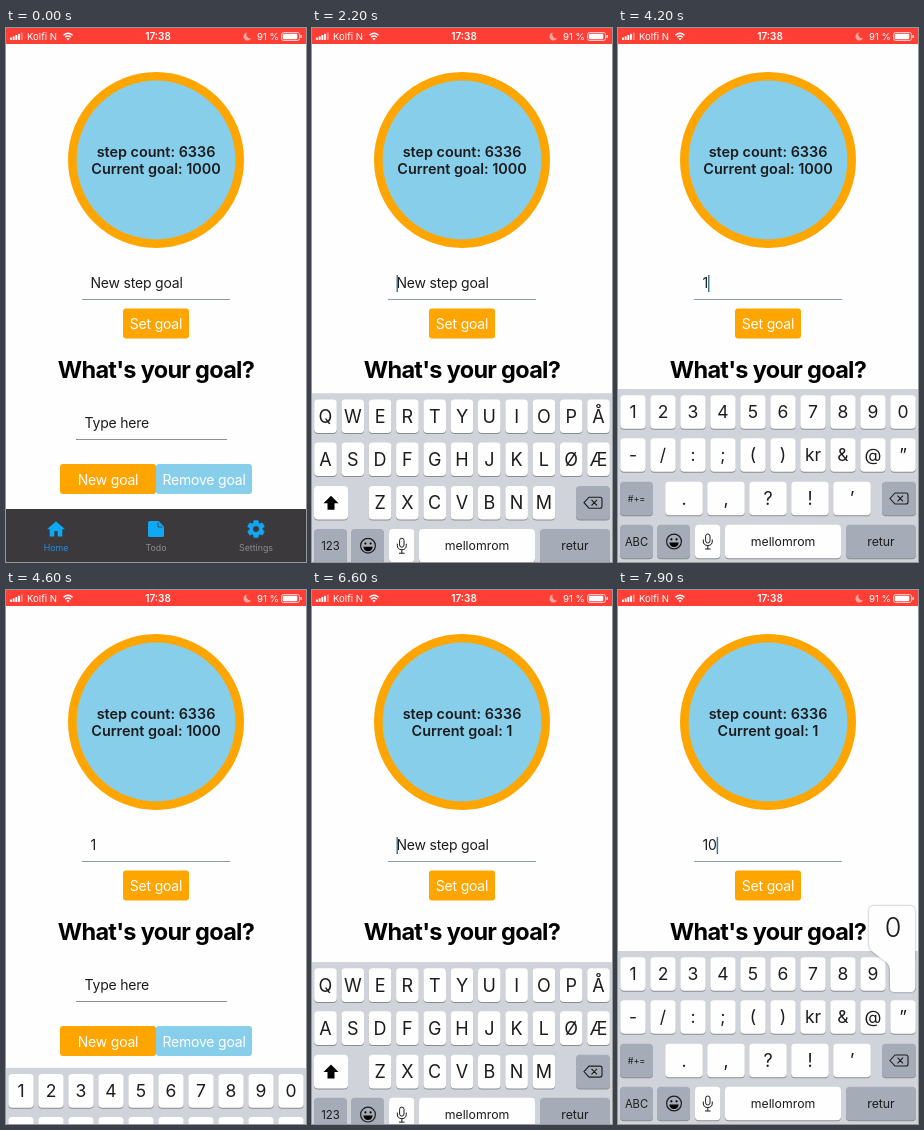
Write an HTML page that moves like this. It is 300x534 px and loops after 8000 ms.

```html
<!DOCTYPE html>
<html lang="en">
<head>
<meta charset="utf-8">
<title>Step goal</title>
<style>
  html, body { margin: 0; width: 100%; height: 100%; overflow: hidden; background: #fefefe; }
  svg { display: block; width: 100%; height: 100%; }
  text { font-family: Inter, "Open Sans", sans-serif; white-space: pre; }
  .body { font-size: 14px; letter-spacing: -.2px; }
  .mid { text-anchor: middle; }
  .popup path { filter: drop-shadow(0 0 1px #0006); }
</style>
</head>
<body>
<svg id="stage" viewBox="0 0 300 534"></svg>
<script>
const LOOP = 8000, STEP = 100, KEYBOARD_HEIGHT = 173;
const ORANGE = '#ffa500', SKY = '#87ceeb', INK = '#1c1c1e', BLUE = '#10a7f4', BAR = '#3b393b';
const WHITE = '#fefefe', GREY_KEY = '#a5acb8';

const label = (str, x, y, size, fill = INK, extra = '') =>
  `<text class="mid" x="${x}" y="${y}" font-size="${size}" fill="${fill}" ${extra}>${str}</text>`;
const rect = (x, y, w, h, fill, r = 0, extra = '') =>
  `<rect x="${x}" y="${y}" width="${w}" height="${h}" rx="${r}" fill="${fill}" ${extra}/>`;
const stroke = (d, color, width, extra = '') =>
  `<path d="${d}" fill="none" stroke="${color}" stroke-width="${width}" ${extra}/>`;
const button = (str, x, y, w, fill, id) =>
  `<g id="${id}">${rect(x, y, w, 30, fill, 3)}
   <text class="body mid" x="${x + w / 2}" y="${y + 20.5}" fill="#fff">${str}</text></g>`;

function statusBar() {
  const bars = [0, 1, 2, 3, 4].map(i =>
    rect(4 + 2.7 * i, 9.6 - 1.3 * i, 1.9, 2.4 + 1.3 * i, '#fff', .4, i > 3 ? 'opacity=".4"' : '')).join('');
  return rect(0, 0, 300, 16, '#ff3f35') + bars +
    '<text x="21" y="12" font-size="9.6" fill="#fff">Kolfi N</text>' +
    stroke('M57.5 7.2Q62 3.4 66.5 7.2M59.2 9.2Q62 6.8 64.8 9.2', '#fff', 1.5) +
    '<path d="M60.4 10.6Q62 9.4 63.6 10.6L62 12.4z" fill="#fff"/>' +
    label('17:38', 152, 12, 10, '#fff', 'font-weight="600"') +
    '<path d="M240.6 4.6A4 4 0 1 0 245 10.4A4.2 4.2 0 0 1 240.6 4.6z" fill="#fff" opacity=".55"/>' +
    label('91 %', 262, 12, 9.6, '#fff') +
    rect(275.5, 4.5, 18, 8, 'none', 2, 'stroke="#fff" stroke-width=".7"') +
    rect(276.7, 5.7, 14.6, 5.6, '#fff', 1) + rect(294.4, 7, 1.3, 3, '#fff', .6);
}

function tabBar() {
  const teeth = [0, 60, 120].map(a =>
    rect(247.4, 492.2, 5.2, 17.6, BLUE, 1, `transform="rotate(${a} 250 501)"`)).join('');
  return rect(0, 481, 300, 53, BAR) +
    `<path d="M48.3 508.5v-5.3h3.4v5.3h4.6v-7.2H59L50 493.2 41 501.3h2.7v7.2z" fill="${BLUE}"/>` +
    `<path d="M144 493H152.5L158 498.5V507.5Q158 509 156.5 509H143.5Q142 509 142 507.5V495Q142 493 144 493z" fill="${BLUE}"/>` +
    stroke('M152 494.5V499H156.5', BAR, .8) +
    teeth + `<circle cx="250" cy="501" r="6.6" fill="${BLUE}"/><circle cx="250" cy="501" r="3" fill="${BAR}"/>` +
    label('Home', 50, 522.5, 8.8, '#1b8fe8') +
    label('Todo', 150, 522.5, 8.8, '#8b8b8e') + label('Settings', 250, 522.5, 8.8, '#8b8b8e');
}

// Keyboard: y is the centre of a key
const key = (str, x, y, w, size = 18, fill = WHITE) =>
  rect(x - w / 2, y - 15.8, w, 33.6, '#898c91', 4) + rect(x - w / 2, y - 16.8, w, 33.6, fill, 4) +
  label(str, x, y + size * .36, size, INK);
const row = (chars, first, pitch, width, y, size) =>
  chars.map((c, i) => key(c, first + pitch * i, y, width, size)).join('');

function keyboard() {
  const letters =
    row([...'QWERTYUIOPÅ'], 13.5, 27.3, 22.6, 384) +
    row([...'ASDFGHJKLØÆ'], 13.5, 27.3, 22.6, 427) +
    key('', 19, 470.5, 34) +
    `<path d="M19 463.5L26.5 471H22.5V477.5H15.5V471H11.5z" fill="#000"/>` +
    row([...'ZXCVBNM'], 68.1, 27.3, 22.6, 470.5) +
    key('123', 18.5, 513.5, 33, 11.4, GREY_KEY);
  const digits =
    row([...'1234567890'], 15, 30, 25.4, 384, 17.5) +
    row(['-', '/', ':', ';', '(', ')', 'kr', '&amp;', '@', '”'], 15, 30, 25.4, 427, 17.5) +
    key('#+=', 18.5, 470.5, 33, 9, GREY_KEY) +
    row(['.', ',', '?', '!', '’'], 66, 42, 37.6, 470.5) +
    key('ABC', 18.5, 513.5, 33, 11.2, GREY_KEY);
  const shared =
    key('', 281, 470.5, 34, 12, GREY_KEY) +
    stroke('M272 470.5L277 465H288Q290 465 290 467V474Q290 476 288 476H277zM279.5 467.7L285 473.3M285 467.7L279.5 473.3', INK, 1.1) +
    key('', 55.5, 513.5, 33, 12, GREY_KEY) +
    `<circle cx="56" cy="513.5" r="7.4" fill="none" stroke="${INK}" stroke-width="1.2"/>
     <circle cx="53.4" cy="511.3" r="1.1"/><circle cx="58.6" cy="511.3" r="1.1"/>
     <path d="M51.3 514.5H60.7Q60 519 56 519T51.3 514.5z"/>` +
    key('', 89.7, 513.5, 25.4) +
    rect(87.6, 506, 4.4, 9, 'none', 2.2, `stroke="${INK}"`) +
    stroke('M85.3 511.5V513Q85.3 517.5 89.8 517.5T94.3 513V511.5M89.8 517.5V521M87 521H92.6', INK, 1) +
    key('mellomrom', 165, 513.5, 116, 12.3) +
    key('retur', 263, 513.5, 70, 12.3, GREY_KEY);
  return rect(0, 361, 300, KEYBOARD_HEIGHT, '#d0d3d9') +
    `<g id="letters">${letters}</g><g id="digits">${digits}</g>${shared}`;
}

const popup = (id, digit, x, mirror) =>
  `<g id="${id}" class="popup"><path fill="${WHITE}" transform="${mirror}"
    d="M8 316H44q5 0 5 5V354q0 5 -4 8L31 373Q28 376 28 380V398q0 4 -4 4H7q-4 0 -4 -4V321q0 -5 5 -5z"/>
   ${label(digit, x, 347, 27, INK, 'font-weight="300"')}</g>`;

document.getElementById('stage').innerHTML =
  rect(0, 0, 300, 534, '#fefefe') +
  `<circle cx="150" cy="132" r="83.7" fill="${SKY}" stroke="${ORANGE}" stroke-width="8.6"/>` +
  label('step count: 6336', 150, 129, 14.4, INK, 'font-weight="600"') +
  label('', 150, 146, 14.4, INK, 'id="goal" font-weight="600"') +
  `<text id="field" class="body" x="84.5" y="260" fill="${INK}"></text>` +
  rect(0, 247, 1.5, 17, '#43789a', 0, 'id="caret"') +
  rect(76, 271, 148, 1, '#8b9ba3') +
  button('Set goal', 117, 280.5, 66, ORANGE, 'setGoal') +
  label('What\'s your goal?', 150, 350, 23.5, '#000', 'font-weight="700" letter-spacing="-.7"') +
  `<text class="body" x="78.5" y="400" fill="${INK}">Type here</text>` +
  rect(70, 411, 151, 1, '#8b8f92') +
  button('New goal', 54, 436, 96, ORANGE, 'newGoal') +
  button('Remove goal', 150, 436, 96, SKY, 'removeGoal') +
  tabBar() + statusBar() +
  `<g id="keyboard">${keyboard()}</g>` +
  popup('popOne', '1', 25, '') + popup('popZero', '0', 275, 'translate(300) scale(-1 1)');

const el = Object.fromEntries([...document.querySelectorAll('[id]')].map(e => [e.id, e]));
const show = (node, on) => node.setAttribute('visibility', on ? 'inherit' : 'hidden');
const within = (t, from, to) => t >= from && t < to;
const clamp = v => Math.max(0, Math.min(1, v));

const OPEN = [1817, 6317], CLOSE = 4484, DIGITS = [2800, 7200];
const CARET_RESETS = [1900, 2800, 4100, 6400, 7200, 7600, 7900];

function keyboardOffset(t) {
  const remaining = since => Math.exp(-.0097 * (t - since));
  if (t < OPEN[0]) return KEYBOARD_HEIGHT;
  if (t < CLOSE) return KEYBOARD_HEIGHT * remaining(OPEN[0]);
  if (t < OPEN[1]) return KEYBOARD_HEIGHT * (1 - remaining(CLOSE));
  return KEYBOARD_HEIGHT * remaining(OPEN[1]);
}

function typedText(t) {
  if (within(t, 4100, 5600)) return '1';
  return t >= 7900 ? '10' : t >= 7600 ? '1' : '';
}

function caretOpacity(t) {
  if (!within(t, 1900, CLOSE) && t < 6400) return 0;
  const age = t - CARET_RESETS.filter(r => r <= t).pop();
  return clamp((700 - age % 1000) / 220);
}

function buttonOpacity(t) {
  if (!within(t, 5400, 5800)) return 1;
  const u = clamp((t - 5590) / 220);
  return .2 + .8 * u * u * (3 - 2 * u);
}

function render() {
  const t = Math.floor(performance.now() % LOOP / STEP) * STEP;
  const typed = typedText(t);
  const digits = within(t, DIGITS[0], OPEN[1]) || t >= DIGITS[1];

  el.goal.textContent = 'Current goal: ' + (t < 5600 ? 1000 : 1);
  el.field.textContent = typed || 'New step goal';
  el.caret.setAttribute('x', 84.5 + (typed ? el.field.getComputedTextLength() : 0));
  el.caret.setAttribute('opacity', caretOpacity(t));
  el.setGoal.setAttribute('opacity', buttonOpacity(t));
  el.keyboard.setAttribute('transform', `translate(0 ${keyboardOffset(t).toFixed(2)})`);
  show(el.letters, !digits);
  show(el.digits, digits);
  show(el.popOne, within(t, 4000, 4200) || within(t, 7500, 7700));
  show(el.popZero, t >= 7900);
  requestAnimationFrame(render);
}
render();
</script>
</body>
</html>
```
